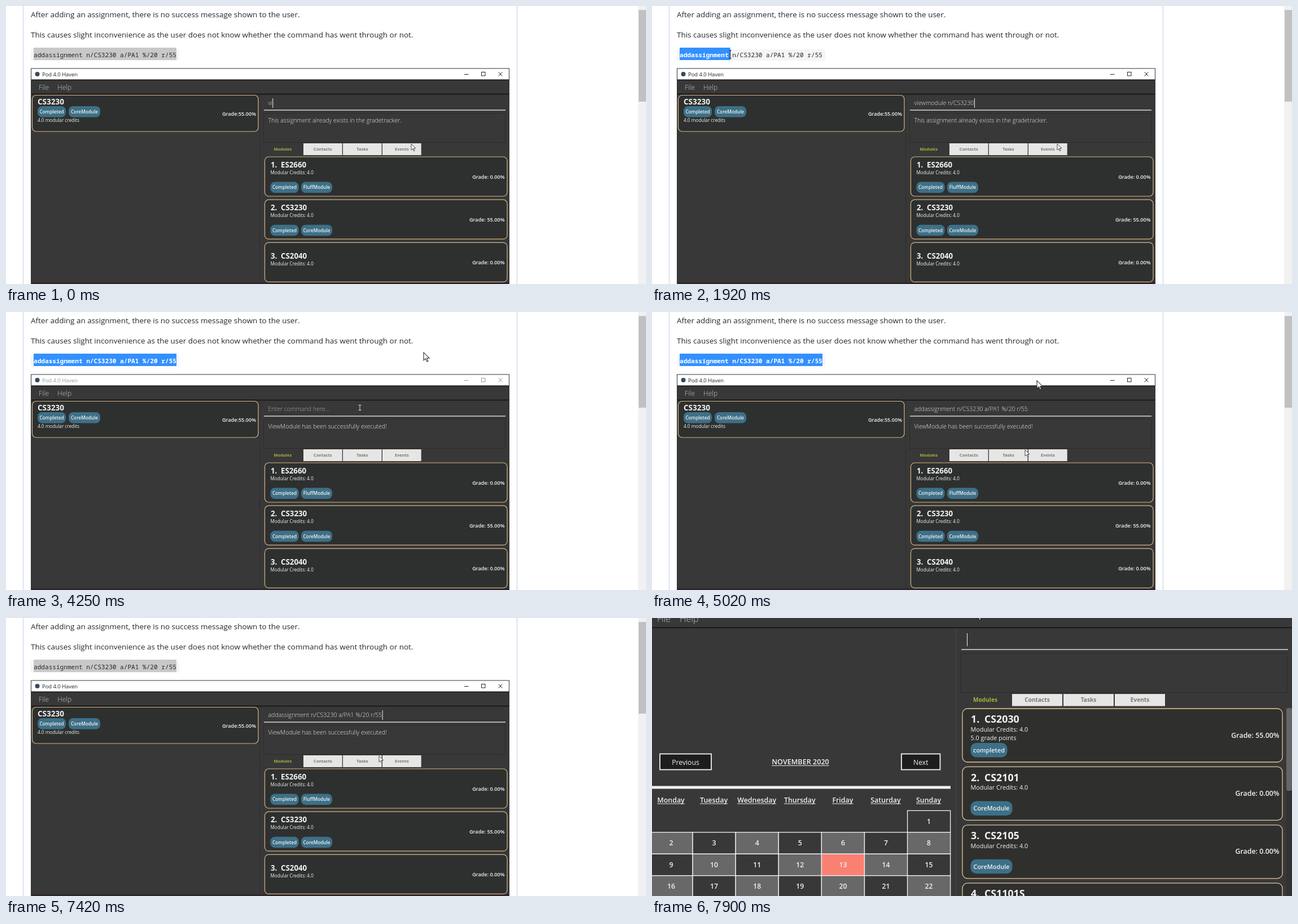
These frames come from a looping animation (1134x494 px, 8000 ms). An HTML page with a canvas:

```html
<!DOCTYPE html>
<html lang="en">
<head>
<meta charset="utf-8">
<title>Missing success message</title>
<style>
html, body { margin: 0; width: 100%; height: 100%; overflow: hidden; background: #fff; }
canvas { display: block; }
</style>
</head>
<body>
<canvas id="stage" width="1134" height="494"></canvas>
<script>
const c = document.getElementById('stage').getContext('2d');
const LOOP = 8000;
const SANS = '"Open Sans", "Noto Sans", sans-serif';
const MONO = '"Noto Sans Mono", "DejaVu Sans Mono", monospace';
const DARK = '#383838', CARD = '#2e302f', TAN = '#d3b586', PILL = '#3d7087', WHITE = '#f2f2f2';
const COMMAND = 'addassignment n/CS3230 a/PA1 %/20 r/55';

function text(s, x, y, size, color, weight = 400, align = 'left', family = SANS) {
  c.font = `${weight} ${size}px ${family}`;
  c.fillStyle = color;
  c.textAlign = align;
  c.fillText(s, x, y);
  return c.measureText(s).width;
}

function rect(x, y, w, h, color) {
  c.fillStyle = color;
  c.fillRect(x, y, w, h);
}

function frame(x, y, w, h, color, line = 1) {
  c.strokeStyle = color;
  c.lineWidth = line;
  c.strokeRect(x, y, w, h);
}

function round(x, y, w, h, r, fill, stroke, line = 1.2) {
  c.beginPath();
  c.roundRect(x, y, w, h, r);
  c.fillStyle = fill;
  c.fill();
  if (stroke) {
    c.strokeStyle = stroke;
    c.lineWidth = line;
    c.stroke();
  }
}

function lines(color, width, ...segments) {
  c.strokeStyle = color;
  c.lineWidth = width;
  c.beginPath();
  for (const [x1, y1, x2, y2] of segments) {
    c.moveTo(x1, y1);
    c.lineTo(x2, y2);
  }
  c.stroke();
}

function arrow(x, y, scale) {
  c.save();
  c.translate(x, y);
  c.scale(scale, scale);
  c.beginPath();
  [[0, 0], [0, 16], [4, 12.5], [6.5, 18.5], [9, 17.5], [6.5, 11.5], [11.5, 11.5]]
    .forEach(p => c.lineTo(...p));
  c.closePath();
  c.fillStyle = '#fff';
  c.fill();
  c.strokeStyle = '#222';
  c.lineWidth = 1.2;
  c.stroke();
  c.restore();
}

function beam(x, y, h, color) {
  const a = y - h / 2, b = y + h / 2;
  lines(color, 1, [x, a, x, b], [x - 2.5, a, x + 2.5, a], [x - 2.5, b, x + 2.5, b]);
}

// Position on a path of [time, x, y] points, or null outside it.
function along(path, t) {
  if (t < path[0][0]) return null;
  for (let i = 1; i < path.length; i++) {
    const [t0, x0, y0] = path[i - 1], [t1, x1, y1] = path[i];
    if (t < t1) {
      const k = (t - t0) / (t1 - t0);
      return [x0 + (x1 - x0) * k, y0 + (y1 - y0) * k];
    }
  }
  return null;
}

const MOUSE = [
  [130, 1038, 470], [210, 600, 210], [290, 192, 36], [440, 150, 32], [880, 86, 72], [980, 86, 72],
  [1300, 56, 80], [1500, 48, 86], [1620, 49, 86], [2080, 186, 86], [2460, 302, 86],
  [2600, 302, 86], [2690, 311, 95], [3940, 311, 95], [4230, 740, 72], [4720, 740, 72],
  [4790, 735, 14], [4870, 682, 122], [6480, 682, 122], [6760, 715, 310], [7030, 640, 500]
];
const CLIP_MOUSE = [
  [0, 718, 245], [2840, 718, 245], [2920, 726, 217], [3150, 726, 217], [3460, 640, 190], [3940, 640, 190]
];
const APP_MOUSE = [[7640, 620, 494], [7880, 575, -12], [8001, 575, -12]];

function pill(label, x, y, w, h, size) {
  round(x, y, w, h, h * .4, PILL);
  text(label, x + w / 2, y + h / 2 + size * .39, size, WHITE, 600, 'center');
}

function tabs(x, y, w, h, step, size) {
  ['Modules', 'Contacts', 'Tasks', 'Events'].forEach((name, i) => {
    const left = x + i * step;
    if (i) rect(left, y, w, h, '#e6e6e4');
    text(name, left + w / 2 - (i ? 0 : 1), y + h / 2 + size * .37, size, i ? '#777' : '#a3b43c', 700, 'center');
  });
}

function drawCode(t) {
  const put = (color, weight = 400) => text(COMMAND, 49, 91, 11.1, color, weight, 'left', MONO);
  round(44, 77, 263, 20, 3, '#f5f5f5');
  if (t < 440 || t >= 7420) rect(49, 74, 253, 22, '#c8c8c8');
  put('#24292e');
  if (t < 1620 || t >= 7420) return;
  const edge = t < 2460 ? along(MOUSE, t)[0] : 302;
  c.save();
  c.beginPath();
  c.rect(49, 74, edge - 49, 22);
  c.clip();
  rect(49, 74, 253, 22, '#3390ff');
  put('#fff', 700);
  c.restore();
}

function clipState(t) {
  const s = { typed: '', caret: true, focus: true, executed: true, result: false };
  if (t < 2000) {
    const count = t < 1152 ? 2 + Math.floor(t / 128) : 11 + Math.floor((t - 1152) / 80);
    s.typed = 'viewmodule n/CS3230'.slice(0, count);
    s.executed = false;
  } else if (t < 3940) {
    s.result = true;
    s.caret = t < 2460 || (t >= 2920 && t < 3460) || t >= 3790;
  } else if (t < 5020) {
    s.focus = t >= 4480;
    s.caret = s.focus;
  } else {
    s.typed = COMMAND;
    s.caret = t >= 7420 || Math.floor((t - 5000) / 470) % 2 === 1;
  }
  return s;
}

function drawTitleBar(focus) {
  const ink = focus ? '#222' : '#999';
  rect(44, 111, 848, 21, '#fff');
  c.beginPath();
  c.arc(55.5, 121, 4, 0, 7);
  c.fillStyle = '#34495e';
  c.fill();
  text('Pod 4.0 Haven', 64, 124.7, 9.4, ink);
  lines(ink, 1, [812, 121.5, 819.5, 121.5], [872.5, 117.5, 879.5, 124.5], [879.5, 117.5, 872.5, 124.5]);
  frame(842.5, 117.5, 6.5, 6.5, ink);
}

function drawModule(i, name, grade, tags) {
  const y = 268 + i * 76.2, drop = tags.length ? 0 : 10;
  round(458.5, y, 429.5, 70, 7, CARD, TAN);
  text(i + 1 + '.', 469, y + 19 + drop, 13.3, WHITE, 700);
  text(name, 487, y + 19 + drop, 13.3, WHITE, 700);
  text('Modular Credits: 4.0', 468.5, y + 30.8 + drop, 8.1, WHITE);
  text('Grade: ' + grade, 883.5, y + 38.6, 9.1, WHITE, 600, 'right');
  tags.forEach((tag, k) => pill(tag, k ? 523 : 468.5, y + 44.5, k ? 55 : 50, 19.5, 8.2));
}

function drawClip(t) {
  const s = clipState(t);
  rect(44, 131, 848, 363, DARK);
  drawTitleBar(s.focus);
  text('File', 58, 148.5, 12, '#c4c4c4', 300);
  text('Help', 91, 148.5, 12, '#c4c4c4', 300);
  lines('#111', 1.4, [44, 131.3, 892, 131.3], [44, 156.5, 892, 156.5]);
  lines('#2d2d2d', 1, [449.5, 157, 449.5, 491]);

  round(46.5, 158.5, 400.5, 64.5, 7, CARD, TAN);
  text('CS3230', 56, 175, 13.5, WHITE, 700);
  pill('Completed', 56, 178, 50, 19.5, 8.2);
  pill('CoreModule', 111, 178, 56, 19.5, 8.2);
  text('4.0 modular credits', 56, 206, 8.2, WHITE);
  text('Grade:55.00%', 443, 194.6, 9.1, WHITE, 600, 'right');
  if (s.result) {
    round(48.5, 361, 396, 54.5, 6, CARD, TAN);
    text('1.  PA1', 59, 377, 12.7, WHITE, 700);
    text('Percentage Accessed % : 20.0', 59, 392.8, 12.7, WHITE, 700);
    text('Result : 55.0', 59, 408.7, 12.7, WHITE, 700);
  }

  const width = text(s.typed, 464.5, 176, 10.6, '#e4e4e4', 300);
  if (!s.focus) text('Enter command here...', 464.5, 176, 10.6, '#aaa', 300);
  if (s.caret) rect(465 + width, 164, 1, 17, '#f0f0f0');
  lines('#d8d8d8', 1.3, [457, 185, 885, 185]);
  frame(456.5, 190.5, 428, 52, '#2c2c2c');
  text(s.executed ? 'ViewModule has been successfully executed!' : 'This assignment already exists in the gradetracker.',
    464.5, 207, 10.5, '#ececec', 300);
  tabs(457, 244, 68.7, 21, 70, 7.5);
  drawModule(0, 'ES2660', '0.00%', ['Completed', 'FluffModule']);
  drawModule(1, 'CS3230', '55.00%', ['Completed', 'CoreModule']);
  drawModule(2, 'CS2040', '0.00%', []);
  rect(44, 491, 848, 3, '#30272b');
  lines('#333', 1, [44.5, 111, 44.5, 494], [891.5, 111, 891.5, 494], [44, 111, 892, 111]);

  if (t >= 3940 && t < 4790) beam(627, 170, 9, '#ddd');
  else {
    const p = t < 3940 ? along(CLIP_MOUSE, t) : [661, 245];
    arrow(p[0], p[1], .68);
  }
}

function drawPage(t) {
  rect(0, 0, 1134, 494, '#fff');
  lines('#bfd0ea', 1, [30.5, 0, 30.5, 494], [905.5, 0, 905.5, 494]);
  rect(1120, 0, 14, 494, '#f1f1f1');
  rect(1121, 7, 13, 163, '#c1c1c1');
  text('After adding an assignment, there is no success message shown to the user.', 44, 20, 13.47, '#24292e');
  text('This causes slight inconvenience as the user does not know whether the command has went through or not.',
    44, 56, 13.47, '#24292e');
  drawCode(t);
  drawClip(t);
  const p = along(MOUSE, t);
  if (!p) return;
  if (t >= 1500 && t < 2640) beam(p[0], p[1], 14, '#222');
  else arrow(p[0], p[1], .87);
}

function underlined(s, x, y, size) {
  const w = text(s, x, y, size, WHITE, 600, 'center');
  rect(x - w / 2, y + 1.5, w, 1, WHITE);
}

function button(label, x, w) {
  rect(x, 241, w, 29, '#1d1d1d');
  frame(x, 241.5, w, 28, WHITE, 1.8);
  text(label, x + w / 2, 260.8, 12.2, WHITE, 400, 'center');
}

function drawCalendar() {
  button('Previous', 14, 91);
  button('Next', 442, 68.5);
  underlined('NOVEMBER 2020', 263, 260.3, 12.6);
  rect(0, 298.5, 529, 5, '#f0f0f0');
  ['Mon', 'Tues', 'Wednes', 'Thurs', 'Fri', 'Satur', 'Sun']
    .forEach((d, i) => underlined(d + 'day', 33.5 + i * 76.1, 328, 12.4));
  for (let day = 1; day <= 22; day++) {
    const cell = day + 5;
    const x = -4 + cell % 7 * 76.1, y = 342.3 + Math.floor(cell / 7) * 38.5;
    rect(x, y, 76.1, 38.5, day === 13 ? '#fa8072' : day % 2 ? DARK : '#686868');
    frame(x, y, 76.1, 38.5, WHITE, 1.3);
    text(day, x + 38, y + 23.5, 12.3, WHITE, 600, 'center');
  }
}

function drawApp(t) {
  rect(0, 0, 1134, 494, DARK);
  text('File', 9, 7, 16, '#c4c4c4', 300);
  text('Help', 49, 7, 16, '#c4c4c4', 300);
  lines('#111', 1.6, [0, 17.3, 1134, 17.3]);
  lines('#4a4a4a', 1, [538.5, 19, 538.5, 494]);
  drawCalendar();
  rect(558, 27, 1, 23, '#f0f0f0');
  lines('#dcdcdc', 1.5, [548, 56, 1127, 56]);
  frame(547.5, 62.5, 577.5, 70, '#2b2b2b');
  tabs(547, 135, 89, 21.5, 91, 10.1);
  ['CS2030', 'CS2101', 'CS2105', 'CS1101S'].forEach((name, i) => {
    const y = 161 + i * 103.4;
    round(550, y, 567, 95, 9, '#2f302e', '#e2c79b', 1.3);
    text(i + 1 + '.', 565, y + 25.2, 17.8, WHITE, 700);
    text(name, 589, y + 25.2, 17.8, WHITE, 700);
    text('Modular Credits: 4.0', 564.5, y + 41, 10.8, WHITE);
    if (!i) text('5.0 grade points', 564.5, y + 56.4, 10.8, WHITE);
    pill(i ? 'CoreModule' : 'completed', 564.5, y + 61, i ? 74 : 65, 25.5, 10.9);
    text(i ? 'Grade: 0.00%' : 'Grade: 55.00%', 1111.5, y + 51.6, 12.4, WHITE, 600, 'right');
  });
  rect(1124, 160, 10, 334, '#323232');
  round(1124, 160, 10, 147, 3, '#666');
  const p = along(APP_MOUSE, t);
  if (p) arrow(p[0], p[1], .87);
}

function tick(now) {
  const t = now % LOOP;
  if (t < 7590) drawPage(t);
  else drawApp(t);
  requestAnimationFrame(tick);
}
requestAnimationFrame(tick);
</script>
</body>
</html>
```
